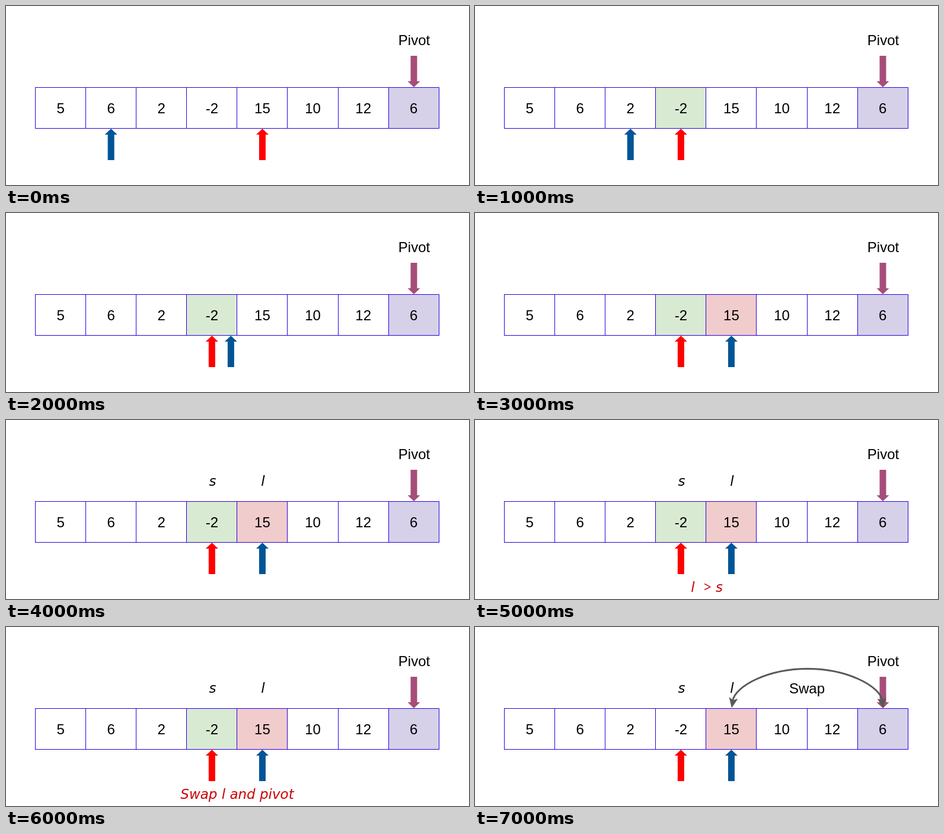
Recreate the animation shown at these times as an HTML page with a canvas. Size 781 by 302 pixels, loop 8 s.

```html
<!DOCTYPE html>
<html lang="en">
<head>
<meta charset="utf-8">
<title>Partition step</title>
<style>
html, body { margin: 0; width: 100%; height: 100%; overflow: hidden; background: #fff; }
canvas { display: block; }
</style>
</head>
<body>
<canvas id="stage" width="781" height="302"></canvas>
<script>
const ctx = document.getElementById('stage').getContext('2d');
const STEP = 1000, LOOP = 8000;
const VALUES = [5, 6, 2, -2, 15, 10, 12, 6];
const TOP = 137.5, BOTTOM = 206.5;
const SANS = '24px "Liberation Sans", Arial, sans-serif';
const ITALIC = 'italic 23px "DejaVu Sans", sans-serif';
const GREEN = '#d9ead3', PINK = '#f1cccc', LILAC = '#d6d1e9';
const BLUE = '#005596', RED = '#ff0000', PLUM = '#a64d79', DARK_RED = '#cc0000', GREY = '#595959';

const edge = i => Math.floor(49.2 + i * 85.15) + 0.5;
const middle = i => 49.5 + (i + 0.5) * 85.1;

// Horizontal positions of the two pointers in each step
const bluePos = [1, 2, 3.376, 4, 4, 4, 4, 4].map(middle);
const redPos = [4, 3, 3, 3, 3, 3, 3, 3].map(middle);

function text(str, x, y, font = SANS, color = '#000') {
  ctx.font = font;
  ctx.fillStyle = color;
  ctx.textAlign = 'center';
  ctx.fillText(str, x, y);
}

function polygon(points, color) {
  ctx.fillStyle = color;
  ctx.beginPath();
  points.forEach(([x, y]) => ctx.lineTo(x, y));
  ctx.closePath();
  ctx.fill();
}

// dir is 1 for an arrow pointing up, -1 for one pointing down
function arrow(x, tip, dir, color) {
  const head = tip + 10 * dir, tail = tip + 53 * dir;
  polygon([[x, tip], [x + 10.5, head], [x + 5.5, head], [x + 5.5, tail],
           [x - 5.5, tail], [x - 5.5, head], [x - 10.5, head]], color);
}

function cells(step) {
  const fills = { 7: LILAC };
  if (step >= 1 && step < 7) fills[3] = GREEN;
  if (step >= 3) fills[4] = PINK;
  ctx.strokeStyle = '#2a00e0';
  ctx.lineWidth = 1;
  VALUES.forEach((value, i) => {
    const x = edge(i), w = edge(i + 1) - x;
    if (fills[i]) {
      ctx.fillStyle = fills[i];
      ctx.fillRect(x, TOP, w, BOTTOM - TOP);
    }
    text(value, middle(i), 181);
  });
  VALUES.forEach((_, i) => ctx.strokeRect(edge(i), TOP, edge(i + 1) - edge(i), BOTTOM - TOP));
}

function swapArc() {
  const cx = 561;
  for (const side of [-1, 1]) {
    const at = dx => cx + side * dx;
    ctx.strokeStyle = GREY;
    ctx.lineWidth = 3;
    ctx.beginPath();
    ctx.moveTo(cx, 70.5);
    ctx.bezierCurveTo(at(66), 70.5, at(122), 99, at(126.5), 125);
    ctx.stroke();
    polygon([[at(128), 136.5], [at(132.5), 118], [at(126), 123.5], [at(117.5), 121]], GREY);
  }
  text('Swap', 560, 112);
}

function draw(step) {
  ctx.fillStyle = '#fff';
  ctx.fillRect(0, 0, 781, 302);
  cells(step);
  text('Pivot', 688.5, 66);
  arrow(688, 137, -1, PLUM);
  arrow(redPos[step], 207, 1, RED);
  arrow(bluePos[step], 207, 1, BLUE);
  if (step >= 4) {
    text('s', 348.5, 111, ITALIC);
    text('l', 433.5, 111, ITALIC);
  }
  if (step === 5) {
    text('l', 367.5, 290, ITALIC, DARK_RED);
    text('>', 392, 290, 'italic 23px "Open Sans", sans-serif', DARK_RED);
    text('s', 412, 290, ITALIC, DARK_RED);
  }
  if (step === 6) text('Swap l and pivot', 390, 290, ITALIC, DARK_RED);
  if (step === 7) swapArc();
}

function frame() {
  draw(Math.floor((performance.now() % LOOP) / STEP));
  requestAnimationFrame(frame);
}
frame();
</script>
</body>
</html>
```
